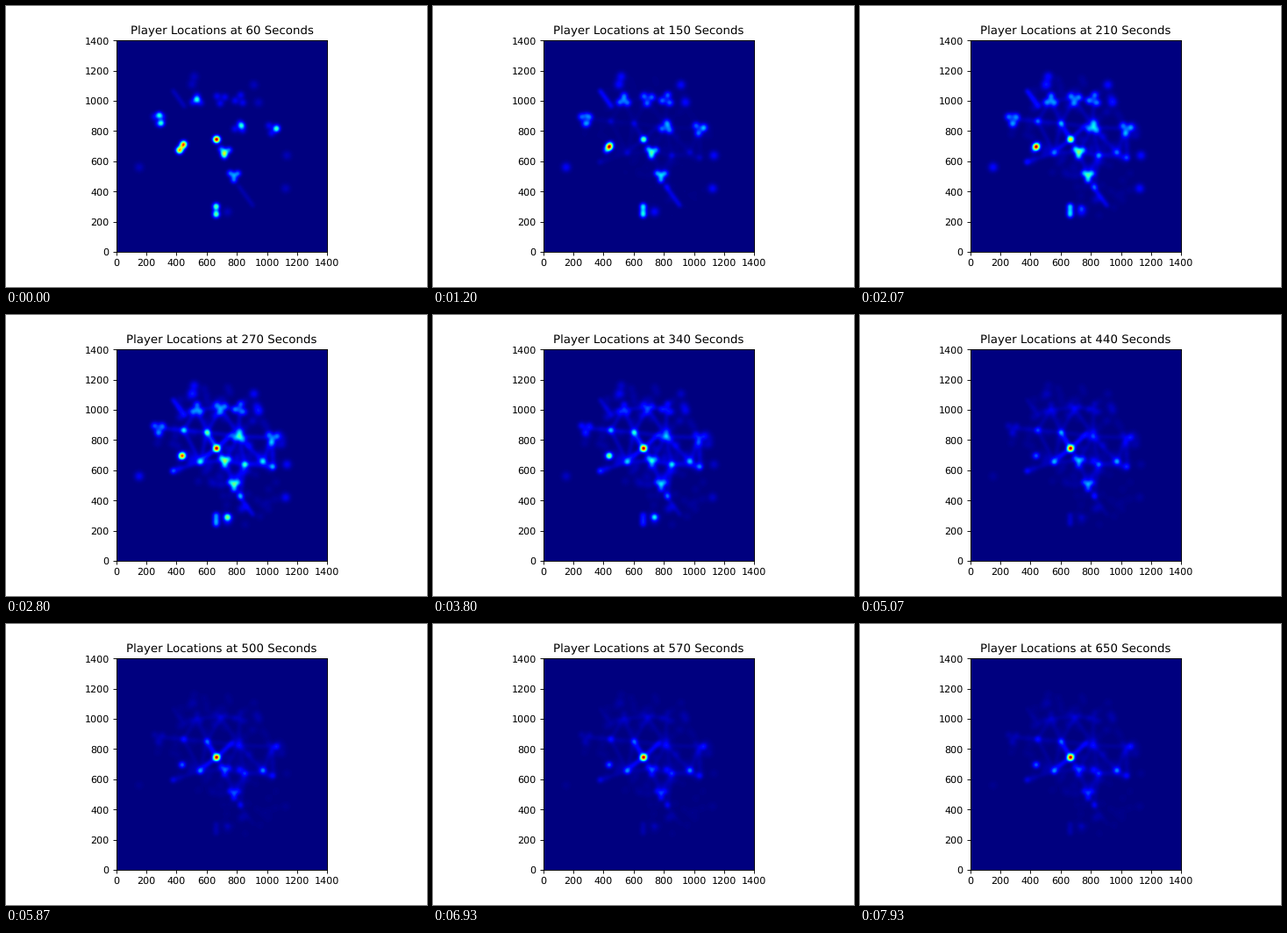
Recreate the animation shown at these times as a matplotlib script. Size 480 by 320 pixels, loop 8 s.

```python
import itertools
import math

import numpy as np
import matplotlib.pyplot as plt
from matplotlib.animation import FuncAnimation

plt.rcParams["text.hinting"] = "no_hinting"

LOOP, STEP = 8000, 50
STATES = 60                       # the map advances 60 times per loop
SIZE, CELLS = 1400, 200
axis = (np.arange(CELLS) + 0.5) * SIZE / CELLS
rng = np.random.default_rng(4)

CENTRE = (663, 744)
CAMPS = [(278, 878), (532, 1003), (690, 1012), (812, 824), (1033, 815), (815, 1008)]
STRONGHOLDS = [(778, 505), (718, 662)]
LANDINGS = [(283, 904), (296, 852), (532, 1008), (828, 835), (1059, 814),
            (712, 650), (660, 301), (660, 249)]
STOPS = [(445, 865), (555, 655), (850, 638), (600, 850), (375, 595),
         (970, 657), (1036, 622), (822, 428)]
LATE_STOPS = [(555, 655), (818, 662), (970, 657), (1059, 814)]
OUTSKIRTS = [(150, 560), (515, 1160), (500, 1108), (910, 1105), (940, 988),
             (1120, 420), (1129, 638), (735, 265)]
ARMS = [(600, 850), (770, 845), (570, 675)]


def ease(u, a, b):
    x = min(max((u - a) / (b - a), 0), 1)
    return x * x * (3 - 2 * x)


# Brightness over the loop, u from 0 to 1
def landing(u):
    return math.exp(-u / 0.12)


def camp(u):
    return (0.5 + 0.5 * ease(u, 0, 0.15)) * (1 - 0.8 * ease(u, 0.35, 0.75))


def hold(u):
    return 1 - 0.45 * ease(u, 0.62, 0.8)


def road(u):
    return ease(u, 0.05, 0.48) * (1 - 0.55 * ease(u, 0.48, 0.75))


def late(u):
    return ease(u, 0.42, 0.7)


def centre(u):
    return 1 - 0.6 * ease(u, 0, 0.12) + 0.6 * ease(u, 0.25, 0.5)


def west(u):
    return (0.3 + 0.5 * ease(u, 0, 0.12)) * (1 - 0.65 * ease(u, 0.42, 0.65))


def south(u):
    return ease(u, 0.2, 0.38) * (1 - 0.9 * ease(u, 0.48, 0.65))


layers, curves = [], []


def spots(curve, level, points, s=15):
    field = np.zeros((CELLS, CELLS))
    for x, y in points:
        field += np.outer(np.exp(-0.5 * ((axis - y) / s) ** 2),
                          np.exp(-0.5 * ((axis - x) / s) ** 2))
    layers.append(level * field)
    curves.append(curve)


def streak(curve, level, a, b, s=13):
    n = int(math.dist(a, b) / 18) + 1
    spots(curve, level / 2, np.linspace(a, b, n), s)


def trefoil(x, y, turn, r=30):
    return [(x + r * math.cos(turn + k * math.tau / 3),
             y + r * math.sin(turn + k * math.tau / 3)) for k in range(3)]


def haze(level, n, mid, radii):
    r, a = np.sqrt(rng.random(n)), rng.random(n) * math.tau
    spots(road, level, zip(mid[0] + radii[0] * r * np.cos(a),
                           mid[1] + radii[1] * r * np.sin(a)), 20)


spots(centre, 1, [CENTRE])
spots(west, 1, [(435, 695)])
spots(landing, 0.72, [(445, 713), (417, 672)])
spots(south, 0.48, [(735, 290)])

spots(landing, 0.36, LANDINGS)
spots(camp, 0.2, [(660, 301), (660, 272), (660, 245)])
for i, spot in enumerate(CAMPS):
    spots(camp, 0.19, trefoil(*spot, 0.5 + i), 17)
for i, spot in enumerate(STRONGHOLDS):
    spots(hold, 0.21, trefoil(*spot, 0.5 + 2 * i) + [spot])
spots(camp, 0.1, OUTSKIRTS, 21)
streak(camp, 0.11, (375, 1066), (450, 962))
streak(camp, 0.09, (810, 434), (903, 307))

spots(road, 0.19, STOPS)
spots(late, 0.15, LATE_STOPS)
for end in ARMS:
    streak(road, 0.16, CENTRE, end)
    streak(late, 0.08, CENTRE, end)
for a, b in itertools.combinations(CAMPS + STRONGHOLDS + STOPS, 2):
    if math.dist(a, b) < 240:
        streak(road, 0.07, a, b)

haze(0.034, 110, (690, 830), (430, 330))
haze(0.025, 30, (840, 470), (230, 230))
layers = np.array(layers)


def heat(state):
    u = state / (STATES - 1)
    field = np.tensordot([curve(u) for curve in curves], layers, 1)
    return field / field.max()


fig, ax = plt.subplots(figsize=(6, 4), dpi=80)
fig.subplots_adjust(left=0.125, right=0.9, bottom=0.125, top=0.8775)
image = ax.imshow(heat(0), cmap="jet", vmin=0, vmax=1, origin="lower",
                  extent=(0, SIZE, 0, SIZE), interpolation="bilinear")
title = ax.set_title("")


def draw(frame):
    state = min(int((frame * STEP + 20) * STATES / LOOP), STATES - 1)
    image.set_data(heat(state))
    title.set_text(f"Player Locations at {60 + 10 * state} Seconds")
    return image, title


anim = FuncAnimation(fig, draw, frames=LOOP // STEP, interval=STEP,
                     repeat=True, repeat_delay=0)
plt.show()
```
